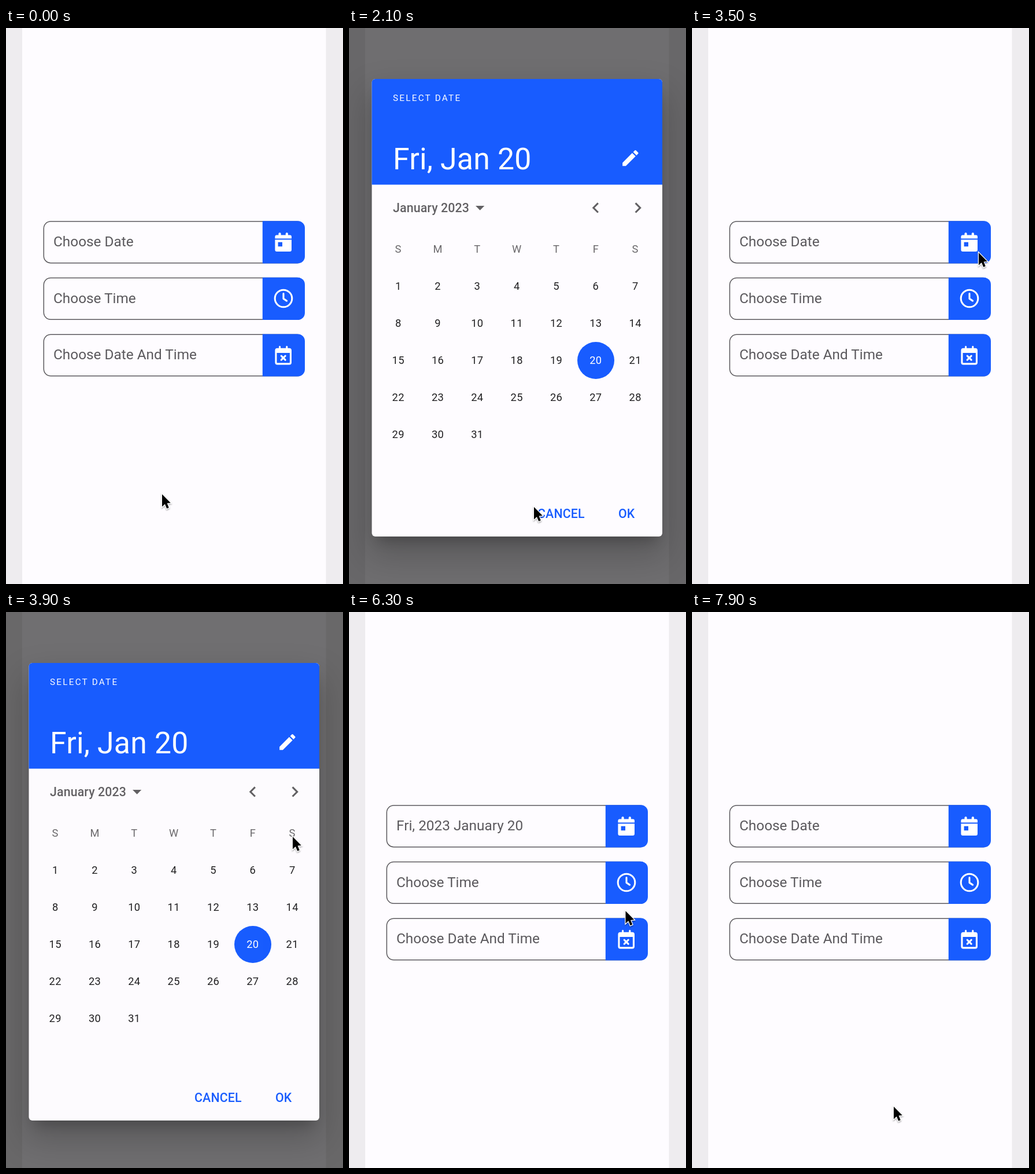
Write an HTML page that moves like this. It is 583 px wide and 960 px high and loops after 8 s.

```html
<!DOCTYPE html>
<html lang="en">
<head>
<meta charset="utf-8">
<title>Date picker</title>
<style>
  html, body { margin: 0; width: 100%; height: 100%; overflow: hidden; background: #eeecef; }
  svg { display: block; width: 100vw; height: 100vh; font-family: Roboto, sans-serif; }
  .label { font-size: 24.35px; fill: #5b595d; }
  .medium { font-size: 21.3px; font-weight: 500; letter-spacing: .15px; }
  .cell { font-size: 18.3px; letter-spacing: .3px; text-anchor: middle; fill: #212022; }
  .blue { fill: #185cff; }
  .white { fill: #fff; }
  .line { fill: none; stroke: #fff; stroke-width: 3.06; stroke-linecap: round; stroke-linejoin: round; }
</style>
</head>
<body>
<svg viewBox="0 0 583 960" preserveAspectRatio="none">
  <defs>
    <filter id="soft" x="-30%" y="-30%" width="160%" height="160%"><feGaussianBlur stdDeviation="11.5"/></filter>
    <filter id="wide" x="-40%" y="-40%" width="180%" height="180%"><feGaussianBlur stdDeviation="30"/></filter>
    <filter id="drop" x="-50%" y="-50%" width="200%" height="200%">
      <feDropShadow dx="0" dy="1.5" stdDeviation="1.3" flood-opacity=".4"/>
    </filter>
    <clipPath id="card"><rect x="39.5" y="88" width="502.5" height="790" rx="6"/></clipPath>
  </defs>

  <rect width="583" height="960" fill="#eeecef"/>
  <rect x="28" width="525.5" height="960" fill="#fefcff"/>

  <g id="fields"></g>

  <g class="white">
    <path d="M465.4 363.4V360.4a3 3 0 0 1 3-3H491a3 3 0 0 1 3 3V363.4z"/>
    <rect x="471.5" y="353.2" width="4.1" height="8" rx="2"/>
    <rect x="483.8" y="353.2" width="4.1" height="8" rx="2"/>
    <path fill-rule="evenodd" d="M465.4 365.4H494V383a3 3 0 0 1-3 3H468.4a3 3 0 0 1-3-3zM470.6 369.8v7.4h7.4v-7.4z"/>
  </g>
  <g class="line">
    <circle cx="480" cy="467" r="14.8"/>
    <path d="M480 458.6V467.4L485.6 471.1"/>
  </g>
  <path class="white" fill-rule="evenodd" d="M469.4 552.8H490a4 4 0 0 1 4 4V577.4a4 4 0 0 1-4 4H469.4a4 4 0 0 1-4-4V556.8a4 4 0 0 1 4-4zM468.5 561V577.3a1 1 0 0 0 1 1H489.9a1 1 0 0 0 1-1V561z"/>
  <path class="line" d="M473.6 550.2V555M485.8 550.2V555M476.2 566.2l7 7m0-7l-7 7"/>

  <rect id="scrim" width="583" height="960" fill="#000"/>

  <g id="dialog">
    <rect x="50" y="116" width="482" height="768" opacity=".22" filter="url(#soft)"/>
    <rect x="33" y="112" width="515" height="800" opacity=".2" filter="url(#wide)"/>
    <g clip-path="url(#card)">
      <rect x="39" y="88" width="504" height="790" fill="#fefcff"/>
      <rect class="blue" x="39" y="88" width="504" height="182.5"/>
    </g>
    <g class="white">
      <text x="76" y="126.2" font-size="15.22" letter-spacing="2.28">SELECT DATE</text>
      <text x="76" y="243.6" font-size="51.75" letter-spacing=".2">Fri, Jan 20</text>
      <path transform="translate(468.6 206.4) scale(1.522)" d="M3 17.25V21h3.75L17.81 9.94l-3.75-3.75zM20.71 7.04c.39-.39.39-1.02 0-1.41l-2.34-2.34c-.39-.39-1.02-.39-1.41 0l-1.83 1.83 3.75 3.75z"/>
    </g>
    <g fill="#626063">
      <text class="medium" x="76" y="318">January 2023</text>
      <path d="M219 307h15.3l-7.65 7.7z"/>
      <path transform="translate(408.5 292.2) scale(1.522)" d="M15.41 7.41L14 6l-6 6 6 6 1.41-1.41L10.83 12z"/>
      <path transform="translate(481.5 292.2) scale(1.522)" d="M10 6L8.59 7.41 13.17 12l-4.58 4.59L10 18l6-6z"/>
    </g>
    <circle class="blue" cx="427" cy="574" r="32"/>
    <g id="grid"></g>
    <rect id="cancelInk" class="blue" x="315" y="811" width="105" height="54.5" rx="6"/>
    <rect id="okInk" class="blue" x="432.3" y="811" width="97.5" height="54.5" rx="6"/>
    <text class="medium blue" x="326" y="846">CANCEL</text>
    <text class="medium blue" x="466" y="846">OK</text>
  </g>

  <g id="cursor" filter="url(#drop)">
    <path transform="translate(1 2)" d="M0 0V21.5L4.9 17L8.2 24.8L11.8 23.2L8.6 15.6L14.8 15z" stroke="#fff" stroke-width="2.4" paint-order="stroke"/>
  </g>
</svg>

<script>
const $ = id => document.getElementById(id);
const LOOP = 8000, STEP = 100;

function add(parent, tag, attrs, text) {
  const el = document.createElementNS('http://www.w3.org/2000/svg', tag);
  for (const k in attrs) el.setAttribute(k, attrs[k]);
  if (text) el.textContent = text;
  parent.append(el);
  return el;
}

// Form fields
const labels = ['Choose Date', 'Choose Time', 'Choose Date And Time'].map((text, i) => {
  const y = 333.2 + i * 97.6, f = $('fields');
  add(f, 'rect', { x: 65.3, y: y + .75, width: 450, height: 71.7, rx: 12, fill: 'none', stroke: '#5b595d', 'stroke-width': 1.5 });
  add(f, 'path', { class: 'blue', d: `M443.8 ${y}H505a12 12 0 0 1 12 12v49.2a12 12 0 0 1-12 12H443.8z` });
  return add(f, 'text', { class: 'label', x: 82, y: y + 43.7 }, text);
});
const value = add($('fields'), 'text', { class: 'label', x: 82, y: 376.9 }, 'Fri, 2023 January 20');

// Month grid
const colX = c => 85.2 + c * 68.33;
[...'SMTWTFS'].forEach((d, c) =>
  add($('grid'), 'text', { class: 'cell', x: colX(c), y: 388.4, style: 'fill:#6a686b' }, d));
for (let d = 1; d <= 31; d++) {
  const row = Math.floor((d - 1) / 7);
  add($('grid'), 'text', {
    class: 'cell', x: colX((d - 1) % 7), y: 452.3 + row * 64,
    style: d === 20 ? 'fill:#fff' : ''
  }, String(d));
}

// Pointer stops: time, x, y, linear
const path = [
  [0, 269, 803], [500, 373, 314], [700, 374, 352],
  [1400, 374, 352], [2100, 319, 825], [2300, 332, 831],
  [2600, 332, 831], [3200, 446, 550], [3400, 490, 339, 1], [3500, 495, 386, 1],
  [4300, 495, 386], [5200, 472, 824],
  [5800, 472, 824], [6600, 480, 371],
  [7100, 480, 371], [7600, 348, 852], [LOOP, 348, 852]
];
// Dialog sessions: open time, close time, button pressed
const sessions = [[860, 2300, 'cancelInk'], [3760, 5200, 'okInk'], [6660, 7600, 'cancelInk']];
const OPEN = 150, CLOSE = 128, FILLED = 5200, CLEARED = 7600;

const clamp = x => Math.max(0, Math.min(1, x));
const easeOut = x => 1 - (1 - x) ** 2;
const smooth = x => x * x * (3 - 2 * x);

function pointer(t) {
  const i = path.findIndex(p => p[0] > t);
  const a = path[i - 1], b = path[i];
  const k = (t - a[0]) / (b[0] - a[0]), e = b[3] ? k : smooth(k);
  return [a[1] + (b[1] - a[1]) * e, a[2] + (b[2] - a[2]) * e];
}

function draw(t) {
  let shown = 0;
  $('cancelInk').style.opacity = $('okInk').style.opacity = 0;
  for (const [open, close, ink] of sessions) {
    if (t < open || t > close + CLOSE) continue;
    shown = easeOut(t < close ? clamp((t - open) / OPEN) : clamp(1 - (t - close) / CLOSE));
    if (t >= close) $(ink).style.opacity = .16;
  }
  $('scrim').style.opacity = .56 * shown;
  $('dialog').style.opacity = shown;

  const filled = t >= FILLED && t < CLEARED;
  value.style.opacity = filled ? 1 : 0;
  labels[0].style.opacity = !filled ? 1 : t < FILLED + 200 ? .3 * shown : 0;

  $('cursor').setAttribute('transform', `translate(${pointer(t)})`);
}

const start = performance.now();
function tick() {
  const t = (performance.now() - start) % LOOP;
  draw(Math.floor(t / STEP) * STEP);
  requestAnimationFrame(tick);
}
tick();
</script>
</body>
</html>
```
